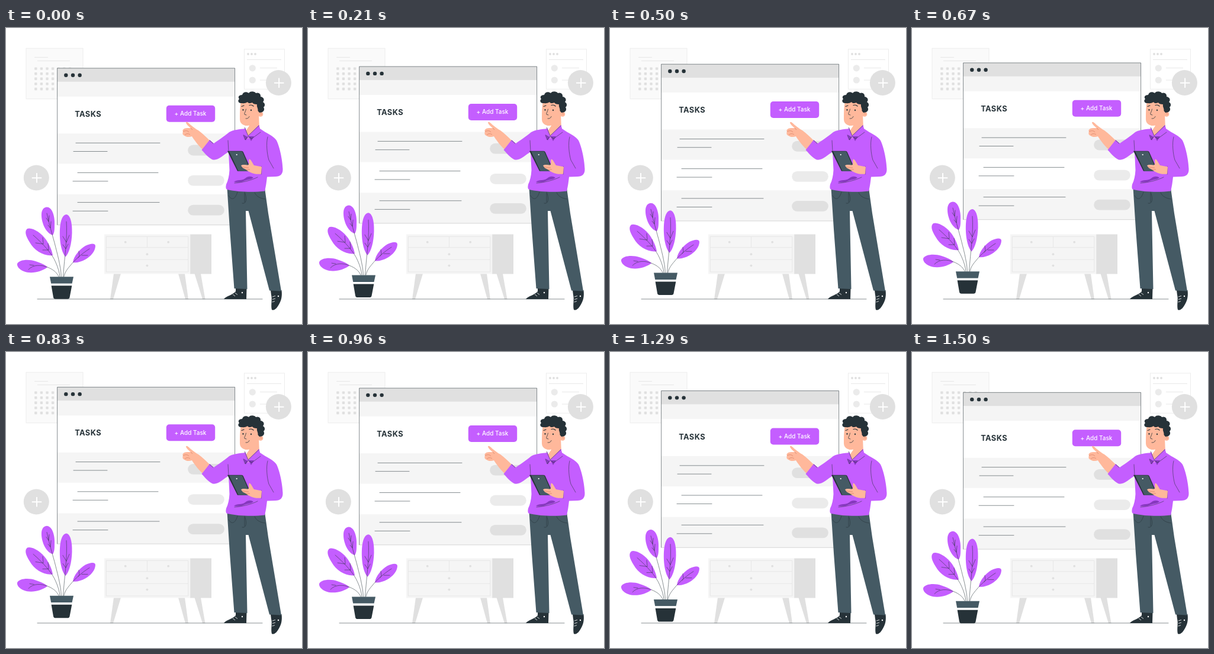
An HTML page that plays this animation: 500 by 500 pixels, repeating every 1540 ms.

```html
<!DOCTYPE html>
<html lang="en">
<head>
<meta charset="utf-8">
<title>Tasks</title>
<style>
  html, body { margin: 0; width: 100%; height: 100%; overflow: hidden; background: #fff; }
  svg { display: block; width: 100vw; height: 100vh; }
  text { font-family: Inter, "Open Sans", sans-serif; }
  .ink, .thin { fill: none; stroke: #263238; stroke-width: .75; stroke-linecap: round; stroke-linejoin: round; }
  .thin { stroke-width: .55; }
  .brow { fill: none; stroke: #263238; stroke-width: 1.2; stroke-linecap: round; }
  .crease { fill: none; stroke: #d57d62; stroke-width: .7; }
  .lace { fill: none; stroke: #fff; stroke-width: .8; }
  .dark { fill: #263238; }
  .slate { fill: #455a64; }
  .violet { fill: #c45eff; }
  .shade { fill: #8638bd; }
  .skin { fill: #ffb89b; }
  .g1 { fill: #f5f5f5; }
  .g2 { fill: #ebebeb; }
  .g3 { fill: #e0e0e0; }
  .rule { fill: none; stroke: #e6e6e6; stroke-width: .9; }
  .plus { fill: none; stroke: #fff; stroke-width: 1.9; }
</style>
</head>
<body>
<svg viewBox="0 0 500 500">
  <!-- calendar -->
  <rect x="34" y="34.3" width="96" height="85.5" fill="#fafafa" stroke="#ebebeb" stroke-width=".9"/>
  <path class="rule" d="M48 49.5H71M53 55.5H108"/>
  <g id="days" class="g3"></g>

  <!-- card -->
  <rect x="402.5" y="35.8" width="68" height="67.5" fill="#fff" stroke="#ebebeb" stroke-width=".9"/>
  <g class="g3"><circle cx="409" cy="44" r="1.9"/><circle cx="415" cy="44" r="1.9"/><circle cx="421" cy="44" r="1.9"/></g>
  <path class="rule" d="M407 53.5H465M429 67.5H458M429 88H445"/>
  <g class="g2"><circle cx="416.3" cy="67.8" r="5.6"/><circle cx="416.3" cy="88" r="5.6"/></g>

  <!-- badges -->
  <g class="g3"><circle cx="51.3" cy="253" r="21.5"/><circle cx="460.4" cy="92.5" r="21.5"/></g>
  <path class="plus" d="M43.8 253.2H60.2M52 245V261.4M453 92.7H469.4M461.2 84.5V100.9"/>

  <!-- cabinet -->
  <g class="g3">
    <path d="M182 415H194L181 458.3H176ZM291 415H302L308 458.3H303ZM318.5 415H329L336.5 458.3H332Z"/>
    <rect x="311" y="348.5" width="36" height="67"/>
  </g>
  <rect class="g1" x="166" y="348.5" width="145.3" height="67"/>
  <path class="rule" d="M169.3 352.3H307.8V412H169.3ZM169.3 370.8H307.8M169.3 391.2H307.8M238.5 352.3V370.8"/>
  <g class="g3"><circle cx="201.7" cy="361.7" r="1.9"/><circle cx="274.2" cy="361.7" r="1.9"/><circle cx="238.4" cy="382.2" r="1.9"/><circle cx="238.4" cy="401.3" r="1.9"/></g>
  <path class="thin" d="M53 457.9H433"/>

  <!-- window -->
  <g class="float">
    <rect x="86.6" y="67.8" width="300" height="264.9" fill="#fff"/>
    <path class="g1" d="M86.6 90H386.6V115.7H86.6ZM86.6 178.2H386.6V229.3H86.6ZM86.6 281H386.6V332.7H86.6Z"/>
    <rect class="g3" x="86.6" y="67.8" width="300" height="22.9"/>
    <path class="thin" d="M86.6 332.5V67.9H386.6V332.5"/>
    <path d="M86.6 332.7H386.6" stroke="#bdbdbd" stroke-width=".6"/>
    <g class="dark"><circle cx="101.3" cy="79.7" r="3.2"/><circle cx="113" cy="79.7" r="3.2"/><circle cx="124.6" cy="79.7" r="3.2"/></g>
    <text class="dark" x="116.2" y="150" font-size="12.8" font-weight="700" letter-spacing=".45">TASKS</text>
    <rect class="violet" x="270.8" y="130.8" width="82.4" height="28" rx="5"/>
    <text x="284.6" y="148.1" font-size="10" font-weight="500" fill="#fff">+ Add Task</text>
    <path class="thin" d="M118 194.2H260M114 208.5H171M121 244.4H257M113 258.8H172M121 294.6H259M113 309.2H172"/>
    <rect class="g3" x="307.2" y="197.6" width="61.6" height="17.8" rx="8.9"/>
    <rect class="g2" x="307.2" y="248.7" width="61.6" height="17.8" rx="8.9"/>
    <rect class="g3" x="307.2" y="298.8" width="61.6" height="17.8" rx="8.9"/>
  </g>

  <!-- plant -->
  <g class="float">
    <g class="violet">
      <path d="M79 350C66 346 59 326 60 313C61 304 67 301 72 303C80 307 83 322 82 335C82 343 81 347 79 350Z"/>
      <path d="M100.5 386.5C93 378 90 358 91 340C92 324 96 315 102 315C109 316 112 330 111.5 346C111 364 107 380 100.5 386.5Z"/>
      <path d="M79 384C64 386 48 376 40 362C33 351 31 343 36 339C44 336 60 346 68 358C74 367 78 377 79 384Z"/>
      <path d="M70 404C60 412 42 416 30 411C22 408 18 402 19 398C23 391 38 390 50 394C60 397 67 401 70 404Z"/>
      <path d="M113 396C114 386 124 374 134 368C143 364 150 363 151 368C151 377 143 386 134 391C127 395 119 397 113 396Z"/>
    </g>
    <path class="thin" d="M69 313C72 328 77 345 82 363C87 383 92 400 93.5 420M102 327C104 355 99 385 96.500 420M46 350C62 364 78 381 84 396C88 405 90 412 91 420M38 408C46 399 60 400 70 404C80 408 86 413 89 420M141 373C128 381 116 392 108 402C102 409 99 414 98 420"/>
    <path class="thin" d="M68 321L72 327L73 317M71 333L75 338L76 327M96 352L102 362L107 350M96 366L101 373L105 365M50 363L63 365L62 354M62 375L72 375L71 364M40 400L47 401M122 388L124 385L123 377M128 384L138 384"/>
    <path class="slate" d="M74 420.3H114L111.5 431.7H76.2Z"/>
    <path fill="#fff" d="M76.2 431.7H111.5L111.2 435.5H76.6Z"/>
    <path class="dark" d="M76.6 435.3H111.3L107.5 455Q107 457.8 104 457.8H83.5Q80.5 457.8 80 455Z"/>
  </g>

  <!-- person -->
  <g>
    <!-- shoes -->
    <path class="dark" d="M388 440H406.5L406 458H368C371 453 383 451 388 445Z"/>
    <path class="dark" d="M447 443H465.5C467 455 464 462 461 467C458 473 453 478 449 476C447 468 450 458 448 451Z"/>
    <path class="lace" d="M383 450L387 453M387 447.5L391 450.5M450 454L455 452.5M450 458.5L455 457M449.5 463L454 461.500"/>
    <g fill="#fff"><circle cx="399" cy="447" r="1.2"/><circle cx="460" cy="453" r="1.2"/></g>

    <!-- trousers -->
    <path class="slate" d="M373.5 270H437L443 313L465 444.5L445 443.5L409.5 309H405L407.5 441L385.5 440L378 340Z"/>
    <path class="thin" d="M376 283C380 291 387 291 391 277M420 278C423 285 430 288 438 289M403 277C407 286 407 298 399 296M403 279V294"/>

    <!-- pointing hand -->
    <path class="skin" d="M304 159.5C305 157.5 308 160 311 163C316 167 321 171 325 173C332 178 338 184 344 190L333 206C325 199 318 189 314 183C309 185 303 184 301 181.5C298 181 298 177 299 175C297 172 301 169 306 169H312C308 166 304 162 304 159.5Z"/>
    <path class="crease" d="M299 175C303 173 307 173 309 176M302 181C304 178 308 178 311 180M312 169L315 172"/>

    <!-- neck -->
    <path class="skin" d="M409 158L411 165L403 177L408 188L428 170L427 145Z"/>

    <!-- shirt -->
    <path class="violet" d="M404 170C395 171 383 172 377 176C367 184 358 190 351 195L344 189L330.5 206C337 213 343 220 349 222.5C359 224 368 214 376 209L377.5 240C377 250 375 258 372 264C371 269 371 272 374 273C392 277 418 278 437 275.5C439 268 440 260 441 251.5L455 251C463 251 468 247 467.5 238C467 222 462 200 457 190C452 182 440 178 429 170L427.5 164L409 187Z"/>
    <path class="violet" d="M404 168L400 183L404 190L409 185L416 188L430 175L427 164L409 182Z"/>
    <path class="shade" d="M401 180L405 190L408 184ZM410 183L414 191L419 183ZM385 260C391 255 398 259 404 254C409 250 414 250 418 253C412 257 407 256 403 258C397 261 391 261 385 260Z"/>
    <path class="thin" d="M403 168L409 182L427 165M401 181L404 189L409 183L415 187L430 176M442 184C439 195 441 213 444 223L452 237M386 262C400 261 415 257 425 252M376 208L375 190M431.5 234L431 247M344 190L350 195"/>

    <!-- tablet -->
    <path class="dark" d="M374 207.8H398Q400 207.8 401 210L415 241.8H391Z"/>
    <path class="slate" d="M377 208.5H399L413.5 241.8H392.5Z"/>
    <circle cx="389.7" cy="214" r="1.1" fill="#fff"/>
    <path class="skin" d="M397 232.5C399 230 405 231 409 231.5C412 229 409 224 411 221.5C414 222 416 228 419 232L432 234.5L431 246.5C420 248 411 244 405 239L400 236.5Z"/>
    <path class="crease" d="M399 235L410 236M405 239L412 239"/>

    <!-- head -->
    <path class="skin" d="M397 124C395 133 395 145 395 154C395 162 402 165.5 408 165C417 164 424 158 427 150L430 125Z"/>
    <circle class="skin" cx="430" cy="145.5" r="4.3"/>
    <path class="dark" d="M397 127C392 127 391 122 394 120C391 116 394 113 399 113C400 108 406 107 410 110C413 106 420 107 422 110C427 108 431 112 430 116C436 117 437 122 434 125C438 127 438 132 435 134C438 138 435 143 428 143L425.5 140C426 135 423 133 424 129C420 129 417 128 416 126C412 128 409 127 408 125C404 128 400 127 397 127Z"/>
    <g class="dark"><ellipse cx="400.5" cy="138.3" rx="1.1" ry="1.4"/><ellipse cx="414" cy="138.8" rx="1.1" ry="1.4"/></g>
    <path class="brow" d="M398 132.5L402 131M411 130.5Q415 129 418 132"/>
    <path class="ink" d="M405.5 137C405 141 402 144 403 146L406 147M405 153C408 153.500 410 152 411 149.5"/>
    <path class="crease" d="M429 145Q431 143 432 146"/>
  </g>
</svg>
<script>
  const FPS = 24, STEPS = 37, PEAK = 17.6, RISE = 9.9;
  const loop = 1540;

  const days = document.getElementById('days');
  for (let row = 0; row < 5; row++) {
    for (let col = 0; col < 7; col++) {
      const r = document.createElementNS('http://www.w3.org/2000/svg', 'rect');
      const box = { x: 48.1 + col * 9.6, y: 66.4 + row * 8.6, width: 4.4, height: 4.4, rx: 0.8 };
      for (const key in box) r.setAttribute(key, box[key]);
      days.append(r);
    }
  }

  // Even rise and fall, held on 24 steps per second.
  const floats = document.querySelectorAll('.float');
  function draw() {
    const t = performance.now() % loop;
    const step = Math.min(STEPS - 1, Math.floor((t + 5) * FPS / 1000 + 1e-6));
    const y = RISE * (Math.abs(step / PEAK - 1) - 1);
    floats.forEach(el => el.setAttribute('transform', `translate(0 ${y.toFixed(2)})`));
    requestAnimationFrame(draw);
  }
  draw();
</script>
</body>
</html>
```
